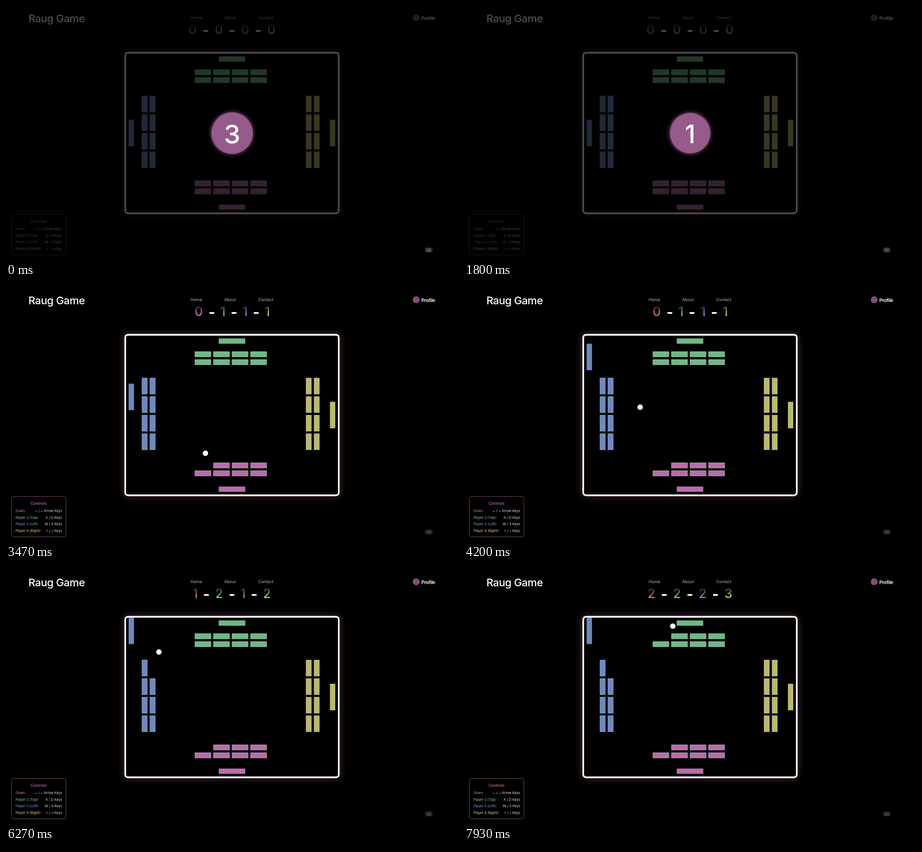
Write an HTML page that moves like this. It is 998 by 561 pixels and loops after 8000 ms.

```html
<!DOCTYPE html>
<html lang="en">
<head>
<meta charset="utf-8">
<title>Raug Game</title>
<style>
  html, body { margin: 0; width: 100%; height: 100%; overflow: hidden; background: #000; }
  svg { display: block; width: 100%; height: 100%; font-family: Inter, "Open Sans", sans-serif; }
  .mid { text-anchor: middle; }
  .end { text-anchor: end; }
</style>
</head>
<body>
<svg id="stage" viewBox="0 0 998 561">
  <defs>
    <filter id="soft" x="-30%" y="-30%" width="160%" height="160%"><feGaussianBlur stdDeviation="8"/></filter>
    <filter id="halo" x="-30%" y="-30%" width="160%" height="160%"><feGaussianBlur stdDeviation="4"/></filter>
  </defs>
  <rect width="998" height="561"/>

  <text x="49.5" y="36" font-size="23.5" font-weight="500" letter-spacing="-.5" fill="#fff">Raug Game</text>
  <g class="mid" font-size="9" fill="#b8b8b8">
    <text x="420.3" y="28.8">Home</text>
    <text x="494.7" y="28.8">About</text>
    <text x="573.4" y="28.8">Contact</text>
  </g>
  <circle cx="905.6" cy="26" r="7.2" fill="#b96cab"/>
  <g fill="none" stroke="#1c0f1a" stroke-width="1">
    <circle cx="905.6" cy="26" r="5"/>
    <circle cx="905.6" cy="24.6" r="1.9"/>
    <path d="M902.4 29.6q3.2-3.6 6.4 0"/>
  </g>
  <text x="917" y="30.6" font-size="10.6" font-weight="600" letter-spacing="-.4" fill="#fff">Profile</text>
  <g id="score" class="mid" font-size="28" font-weight="500"></g>

  <rect x="261.5" y="101.5" width="475" height="358" rx="8" fill="#b96cab" opacity=".45" filter="url(#soft)"/>
  <rect x="263.3" y="103.4" width="471.4" height="354.4" rx="6" stroke="#fff" stroke-width="3.7"/>
  <g id="field"></g>
  <circle id="ball" r="6" fill="#fff"/>

  <rect x="12.2" y="460.5" width="120" height="89" rx="4" stroke="#7a4871"/>
  <text class="mid" x="72" y="478.6" font-size="8.8" font-weight="500" fill="#b96cab">Controls</text>
  <g id="keys" font-size="7.5"></g>

  <g id="overlay">
    <rect width="998" height="561" opacity=".7"/>
    <g id="count">
      <circle r="45" fill="#bc70ae" opacity=".65" filter="url(#halo)"/>
      <circle r="44" fill="#965a8b"/>
      <circle r="6" fill="#fff" opacity=".07"/>
      <text id="digit" class="mid" y="22" font-size="56" font-weight="500" fill="#fff"></text>
    </g>
  </g>
  <g id="badge">
    <g fill="#222" stroke="#777" stroke-width=".9">
      <circle cx="930.3" cy="538.8" r="4.9"/>
      <circle cx="936.5" cy="538.8" r="4.9"/>
    </g>
    <text class="mid" x="933.4" y="541.6" font-size="7.6" font-weight="600" fill="#aaa">GB</text>
  </g>
</svg>
<script>
const LOOP = 8000, START = 2626;
const PINK = '#b96cab', GREEN = '#6fb886', BLUE = '#6f88c0', YELLOW = '#bbb96a';
const COLORS = [PINK, GREEN, BLUE, YELLOW];
const HITS = [3348, 6087, 7765];
const SCORES = ['0000', '0111', '1212', '2223'];
const DIGIT_WIDTH = [18, 9, 16.5, 17];

// Ball bounces: time, x, y
const PATH = [
  [START, 499, 281], [3348, 449, 382], [5275, 313.2, 114], [5610, 288.5, 161],
  [6087, 324, 192], [7395, 421, 113], [7765, 449, 134], [LOOP, 466, 120]
];

const $ = id => document.getElementById(id);

function add(parent, tag, attrs, text) {
  const el = document.createElementNS('http://www.w3.org/2000/svg', tag);
  for (const k in attrs) el.setAttribute(k, attrs[k]);
  if (text) el.textContent = text;
  return parent.appendChild(el);
}

function box(x, y, width, height, fill, extra) {
  return add($('field'), 'rect', { x, y, width, height, fill, ...extra });
}

function brick(x, y, w, h, fill) {
  return box(x + .5, y + .5, w - 1, h - 1, fill, { stroke: '#fff', 'stroke-opacity': .45 });
}

// Bricks per side, listed as [row][column]
function wall(lines, fill, upright) {
  return lines.map(p => [0, 1, 2, 3].map(i => upright
    ? brick(p, 198.3 + i * 41, 12.7, 36.5, fill)
    : brick(416.5 + i * 41, p, 36.5, 12.7, fill)));
}

const top4 = wall([140, 157.5], GREEN);
const bottom4 = wall([385.5, 403], PINK);
const left4 = wall([299.7, 317.3], BLUE, true);
wall([662, 679.7], YELLOW, true);
const broken = [bottom4[0][0], left4[1][0], top4[0][0]];

box(469.7, 111.3, 58.6, 11.7, GREEN);
box(469.7, 438.5, 58.6, 11.7, PINK);
box(715.2, 251.3, 11.8, 58.6, YELLOW);
const paddle = box(270.8, 251.3, 11.8, 58.6, BLUE);

const defs = document.querySelector('defs');
const digits = COLORS.map((color, i) => {
  const grad = add(defs, 'linearGradient', {
    id: 'fade' + i, gradientUnits: 'userSpaceOnUse', x1: 0, x2: 0, y1: 41, y2: 57
  });
  add(grad, 'stop', { offset: 0, 'stop-color': color, 'stop-opacity': .35 });
  add(grad, 'stop', { offset: 1, 'stop-color': color });
  return add($('score'), 'text', { y: 62.3, fill: `url(#fade${i})` });
});
const dashes = [0, 1, 2].map(() =>
  add($('score'), 'text', { y: 64.5, fill: '#fff', 'font-size': 32, 'font-weight': 700 }, '-'));

[
  ['Down:', '←', '→', 'Arrow Keys'],
  ['Player 2 (Top):', 'A', 'D', 'Keys'],
  ['Player 3 (Left):', 'W', 'S', 'Keys'],
  ['Player 4 (Right):', '↑', '↓', 'Keys']
].forEach(([label, a, b, keys], i) => {
  const y = 495 + i * 14.6;
  add($('keys'), 'text', { x: 21, y, fill: COLORS[i], 'font-size': 7.4, 'font-weight': 500 }, label);
  const line = add($('keys'), 'text', { x: 124, y, class: 'end', fill: '#ddd' });
  const size = i % 3 ? 7.5 : 5.6;
  add(line, 'tspan', { 'font-size': size }, a);
  add(line, 'tspan', {}, ' / ');
  add(line, 'tspan', { 'font-size': size }, b);
  add(line, 'tspan', {}, ' ' + keys);
});

function ballAt(t) {
  if (t <= START) return [499, 281];
  const i = PATH.findIndex(p => p[0] >= t);
  const [t0, x0, y0] = PATH[i - 1], [t1, x1, y1] = PATH[i];
  const k = (t - t0) / (t1 - t0);
  return [x0 + (x1 - x0) * k, y0 + (y1 - y0) * k];
}

function showScore(score) {
  const widths = [...score].map(d => DIGIT_WIDTH[d]);
  let x = 499 - (widths.reduce((a, b) => a + b) + 120) / 2;
  widths.forEach((w, i) => {
    digits[i].textContent = score[i];
    digits[i].setAttribute('x', x + w / 2);
    x += w + 40;
    if (i < 3) dashes[i].setAttribute('x', x - 20);
  });
}

function draw(t) {
  const hits = HITS.filter(h => t >= h).length;
  showScore(SCORES[hits]);
  broken.forEach((b, i) => b.setAttribute('visibility', i < hits ? 'hidden' : 'visible'));

  const [x, y] = ballAt(t);
  $('ball').setAttribute('cx', x);
  $('ball').setAttribute('cy', y);
  paddle.setAttribute('y', Math.max(105, 251.3 - Math.max(0, t - 3140) * .121));

  const waiting = t < START;
  $('overlay').setAttribute('visibility', waiting ? 'visible' : 'hidden');
  $('badge').setAttribute('opacity', waiting ? .8 : .6);
  if (waiting) {
    const left = (START - t) / 1000;
    const scale = 1 + .0225 * (1 - Math.cos(2 * Math.PI * left));
    $('digit').textContent = Math.ceil(left);
    $('count').setAttribute('transform', `translate(499.3 280.8) scale(${scale})`);
  }
}

const begin = performance.now();
function tick() {
  draw((performance.now() - begin) % LOOP);
  requestAnimationFrame(tick);
}
tick();
</script>
</body>
</html>
```
